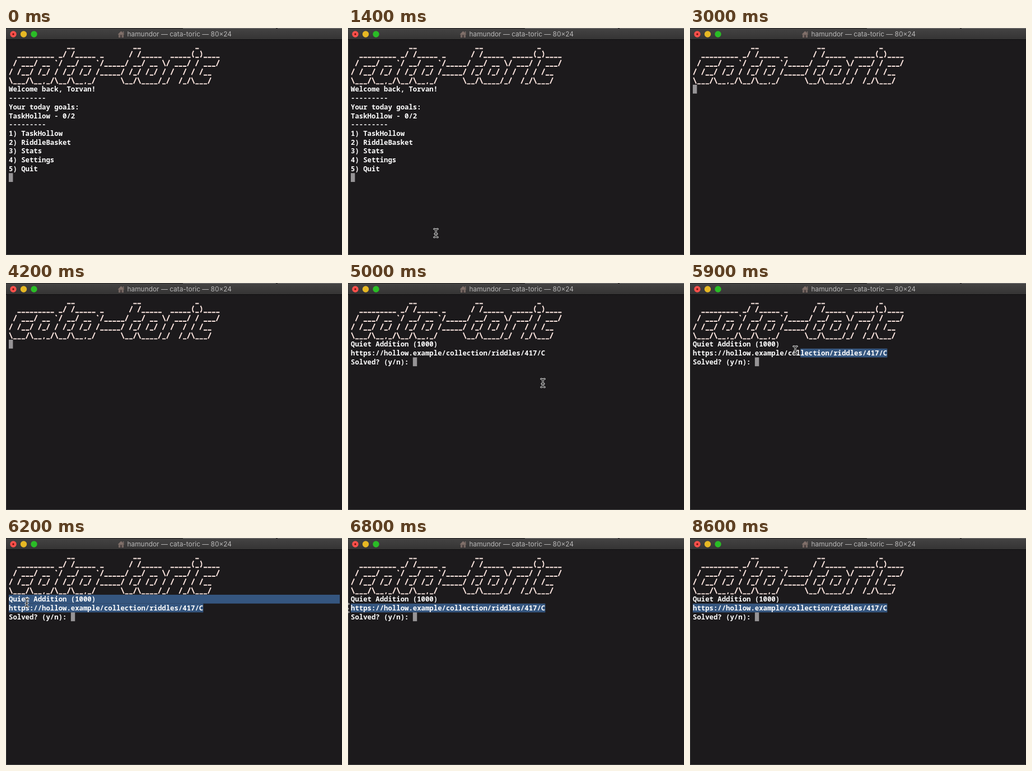
An HTML page with a canvas for the animation above (8.7 s loop, 600 by 404 pixels).

```html
<!DOCTYPE html>
<html lang="en">
<head>
<meta charset="utf-8">
<title>Terminal</title>
<style>
html, body { margin: 0; width: 100%; height: 100%; overflow: hidden; background: #1c1a1c; }
canvas { display: block; }
</style>
</head>
<body>
<canvas id="stage" width="600" height="404"></canvas>
<script>
const ctx = document.getElementById('stage').getContext('2d');
const LOOP = 8700, STEP = 100;
const LEFT = 5, TOP = 22.3, CELL = 7.39, ROW = 15.73;
const MONO = '600 12.32px "Noto Sans Mono", monospace';
const FIRST_ROW = 5;

const BANNER = [
  '              __              __             _',
  '  _________ _/ /_____ _      / /_____  _____(_)____',
  ' / ___/ __ `/ __/ __ `/_____/ __/ __ \\/ ___/ / ___/',
  '/ /__/ /_/ / /_/ /_/ /_____/ /_/ /_/ / /  / / /__',
  '\\___/\\__,_/\\__/\\__,_/      \\__/\\____/_/  /_/\\___/'
];
// Pen strokes of each banner character inside its cell
const STROKES = {
  '_': [0.6, 14.2, 6.8, 14.2],
  '/': [1.3, 14, 6.1, 3],
  '\\': [1.3, 3, 6.1, 14],
  '`': [2.4, 3.2, 4.4, 5.4],
  ',': [4.2, 11.6, 3, 14.6],
  '(': [5, 2.6, 5, 14.4, 0.6],
  ')': [2.4, 2.6, 2.4, 14.4, 6.8]
};

const LINK = 'https://hollow.example/collection/riddles/417/C';
const MENU = [
  'Welcome back, Torvan!', '---------', 'Your today goals:', 'TaskHollow - 0/2', '---------',
  '1) TaskHollow', '2) RiddleBasket', '3) Stats', '4) Settings', '5) Quit', ''
];
const TASK = ['Quiet Addition (1000)', LINK, 'Solved? (y/n): '];

// Pointer paths: [time, x, y]; the pointer is hidden outside of each path
const PATHS = [
  [[100, 6, 372], [500, 150, 376], [900, 150, 376], [1000, 154, 394], [1200, 157, 368], [1400, 157, 365], [1500, 157, 365]],
  [[4800, 388, 392], [4900, 362, 250], [5000, 348, 178], [5200, 350, 146], [5500, 354, 126],
   [5700, 352, 125], [5900, 188, 120], [6000, 84, 114], [6100, 8, 110], [6200, 37, 115],
   [6500, 22, 116], [6700, 6, 123], [6900, -10, 126]]
];

const rowTop = r => TOP + r * ROW;
const colX = c => LEFT + c * CELL;

function fill(color, x, y, w, h) {
  ctx.fillStyle = color;
  ctx.fillRect(x, y, w, h);
}

function line(text, row) {
  ctx.font = MONO;
  ctx.fillStyle = '#fff';
  ctx.fillText(text, LEFT, rowTop(row) + 12.4);
}

function disc(x, y, r, color) {
  ctx.fillStyle = color;
  ctx.beginPath();
  ctx.arc(x, y, r, 0, Math.PI * 2);
  ctx.fill();
}

function drawWindow() {
  fill('#1c1a1c', 0, 0, 600, 404);
  const bar = ctx.createLinearGradient(0, 1, 0, 20);
  bar.addColorStop(0, '#444343');
  bar.addColorStop(1, '#353434');
  fill(bar, 0, 1, 600, 19);
  fill('#222122', 0, 0, 600, 1);
  fill('#777677', 316, 0, 166, 1);
  fill('#777677', 485, 0, 115, 1);
  fill('#0e0d0e', 0, 20, 600, 1);
  fill('#3a393a', 0, 21, 1, 383);
  fill('#454445', 1, 403, 598, 1);

  disc(13, 11, 5.7, '#fc504b');
  disc(13, 11, 1.7, '#76100d');
  disc(31.5, 11, 5.7, '#e7b824');
  disc(50, 11, 5.7, '#2abd26');

  // House icon
  ctx.fillStyle = '#81706a';
  ctx.beginPath();
  ctx.moveTo(199.5, 11.5);
  ctx.lineTo(205.5, 5.5);
  ctx.lineTo(211.5, 11.5);
  ctx.fill();
  fill('#756762', 201, 11, 9, 6);
  fill('#756762', 208.5, 6, 2, 4);
  fill('#4b403f', 204, 12.5, 3, 4.5);

  ctx.font = '11.9px Inter, sans-serif';
  ctx.fillStyle = '#b8b7b7';
  ctx.fillText('hamundor — cata-toric — 80×24', 216.5, 15.3);
}

function drawBanner() {
  ctx.strokeStyle = '#fde7e1';
  ctx.lineWidth = 1.9;
  ctx.lineCap = 'butt';
  ctx.beginPath();
  BANNER.forEach((text, r) => [...text].forEach((ch, c) => {
    const s = STROKES[ch];
    if (!s) return;
    const x = colX(c), y = rowTop(r);
    ctx.moveTo(x + s[0], y + s[1]);
    if (s.length > 4) ctx.quadraticCurveTo(x + s[4], y + 8.5, x + s[2], y + s[3]);
    else ctx.lineTo(x + s[2], y + s[3]);
  }));
  ctx.stroke();
}

function linesAt(t) {
  if (t < 1500) return MENU;
  if (t < 2000) return [...MENU.slice(0, -1), '1'];
  return t < 4400 ? [''] : TASK;
}

function pointerAt(t) {
  const path = PATHS.find(p => t >= p[0][0] && t < p[p.length - 1][0]);
  if (!path) return null;
  const i = path.findIndex(p => p[0] > t);
  const [t0, x0, y0] = path[i - 1], [t1, x1, y1] = path[i];
  const k = (t - t0) / (t1 - t0);
  return { x: x0 + (x1 - x0) * k, y: y0 + (y1 - y0) * k };
}

function drawSelection(t) {
  if (t < 5800) return;
  const color = '#35567f', end = colX(LINK.length);
  const wholeTitle = t >= 6100 && t < 6700;
  const col = t < 6100 ? Math.ceil((pointerAt(t).x - LEFT) / CELL) + 1 : 0;
  if (wholeTitle) fill(color, LEFT, rowTop(5), 591, ROW);
  fill(color, colX(col), rowTop(6), end - colX(col), ROW);
}

function drawPointer({ x, y }) {
  ctx.lineCap = 'round';
  ctx.lineJoin = 'round';
  ctx.beginPath();
  for (const d of [-1, 1]) {
    ctx.moveTo(x - 3.2, y + d * 7.2);
    ctx.quadraticCurveTo(x, y + d * 7.2, x, y + d * 5);
    ctx.quadraticCurveTo(x, y + d * 7.2, x + 3.2, y + d * 7.2);
  }
  ctx.moveTo(x, y - 5);
  ctx.lineTo(x, y + 5);
  ctx.moveTo(x - 2, y + 1.2);
  ctx.lineTo(x + 2, y + 1.2);
  for (const [color, width] of [['#f4f4f4', 3], ['#1a1a1a', 1.3]]) {
    ctx.strokeStyle = color;
    ctx.lineWidth = width;
    ctx.stroke();
  }
}

function draw(now) {
  const t = Math.floor((now % LOOP) / STEP) * STEP;
  drawWindow();
  drawBanner();
  drawSelection(t);
  const lines = linesAt(t);
  lines.forEach((text, i) => line(text, FIRST_ROW + i));
  const last = lines.length - 1;
  fill('#969496', colX(lines[last].length), rowTop(FIRST_ROW + last), CELL, ROW);
  const pointer = pointerAt(t);
  if (pointer) drawPointer(pointer);
}

let start;
function tick(now) {
  start ??= now;
  draw(now - start);
  requestAnimationFrame(tick);
}
draw(0);
requestAnimationFrame(tick);
</script>
</body>
</html>
```
